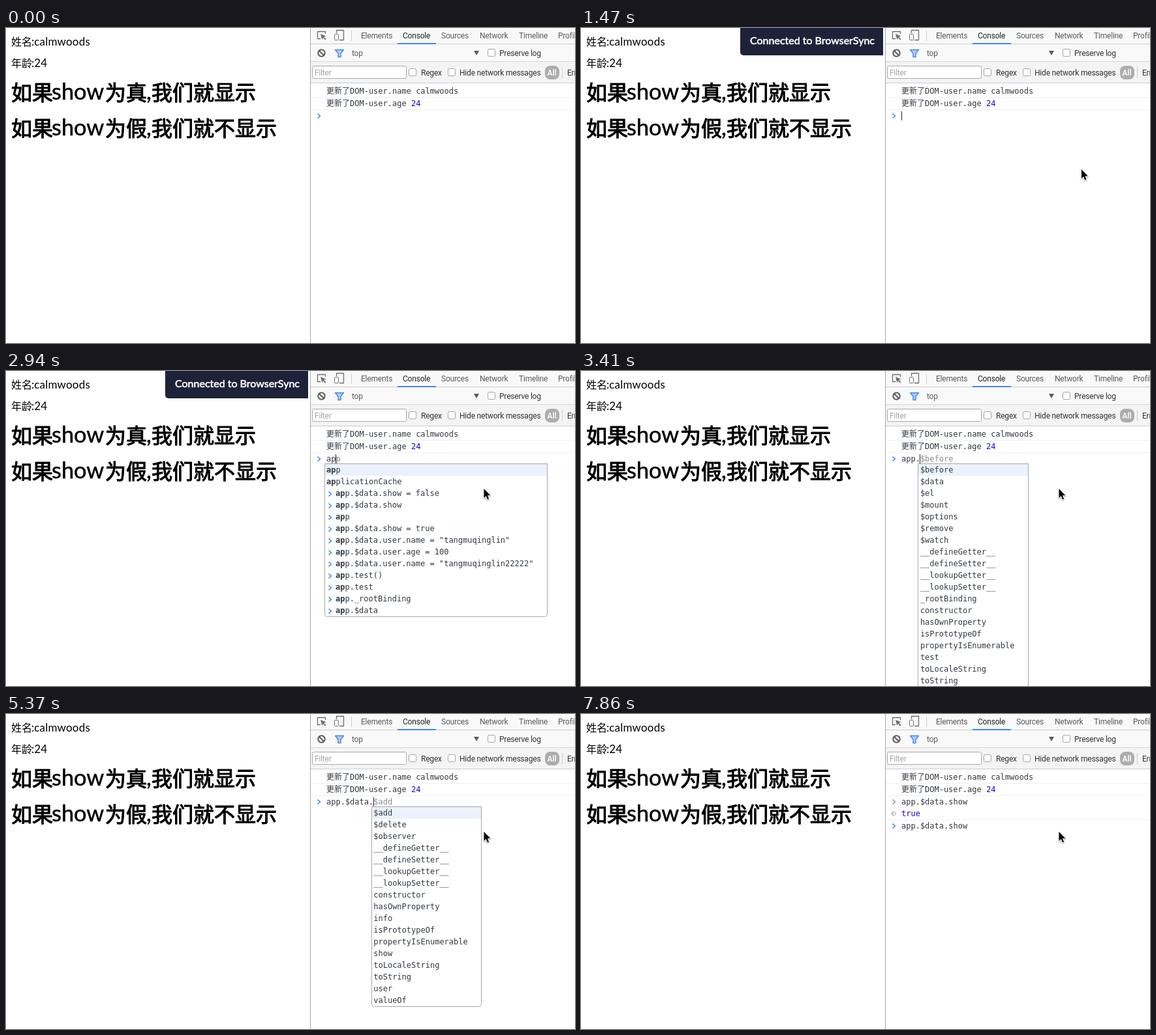
Recreate the animation shown at these times as an HTML page with a canvas. Size 872 by 484 pixels, loop 8000 ms.

```html
<!DOCTYPE html>
<html lang="zh">
<head>
<meta charset="utf-8">
<title>Console demo</title>
<style>
html, body { margin: 0; width: 100%; height: 100%; overflow: hidden; background: #fff; }
canvas { display: block; width: 872px; height: 484px; }
</style>
</head>
<body>
<canvas id="stage"></canvas>
<script>
const W = 872, H = 484, LOOP = 8000;
const cv = document.getElementById('stage');
const g = cv.getContext('2d');
const dpr = window.devicePixelRatio || 1;
cv.width = W * dpr;
cv.height = H * dpr;

const CJK = '"Noto Sans CJK SC", "Noto Sans CJK", "Noto Sans CJK JP", sans-serif';
const UI = '12px Roboto, sans-serif';
const MONO = '12px "DejaVu Sans Mono", ' + CJK.replace('sans-serif', 'monospace');
const ROUND = size => size + 'px Lato, sans-serif';
const INK = '#303942', NUM = '#1c00cf', BLUE = '#4285f4';
const COL = 7.2246, LEFT = 491;
const USER = 'calmwoods', OWNER = 'tangmuqinglin';

// ---------- console data ----------
const history = [
  'app.$data.show = false', 'app.$data.show', 'app', 'app.$data.show = true',
  `app.$data.user.name = "${OWNER}"`, 'app.$data.user.age = 100',
  `app.$data.user.name = "${OWNER}22222"`,
  'app.test()', 'app.test', 'app._rootBinding', 'app.$data'
];
const words = s => s.split(' ');
const magic = '__defineGetter__ __defineSetter__ __lookupGetter__ __lookupSetter__';
const members = {
  0: words('addEventListener alert app applicationCache arguments atob'),
  4: words('$before $data $el $mount $options $remove $watch ' + magic +
    ' _rootBinding constructor hasOwnProperty isPrototypeOf propertyIsEnumerable' +
    ' test toLocaleString toString valueOf'),
  10: words('$add $delete $observer ' + magic + ' constructor hasOwnProperty info' +
    ' isPrototypeOf propertyIsEnumerable show toLocaleString toString user valueOf')
};

// key time, typed length, time the suggestions follow
const CMD = 'app.$data.show';
const keys = [
  [2520, 1, 2640], [2940, 2, 2940], [3150, 3, 3150], [3410, 4, 3410],
  [4130, 5, 4160], [4480, 6, 4510], [4660, 7, 4690], [4900, 8, 4900],
  [5080, 9, 5100], [5340, 10, 5370], [5660, 11, 5660], [5750, 12, 5750],
  [5930, 13, 5930], [6050, 14, 6050]
];
const CLEAR = 890, BLANK = 970, READY = 1150, TOAST = [1220, 3270];
const ENTER = 6970, RESULT = 7000, RECALL = 7470;
const caretOn = [[230, 680], [CLEAR, 1720], [2070, 6520], [ENTER, 7860]];

const within = (t, [a, b]) => t >= a && t < b;
const typed = (t, slot) => {
  const hit = keys.filter(k => k[slot] <= t).pop();
  return hit ? CMD.slice(0, hit[1]) : '';
};

// ---------- drawing helpers ----------
function text(s, x, y, font, color, spacing = 0) {
  g.font = font;
  g.fillStyle = color;
  g.letterSpacing = spacing + 'px';
  g.fillText(s, x, y);
  return x + g.measureText(s).width;
}
// regular face thickened by an outline, lighter than a true bold
function heavy(s, x, y, font, color, weight) {
  text(s, x, y, font, color);
  g.strokeStyle = color;
  g.lineWidth = weight;
  g.lineJoin = 'round';
  g.strokeText(s, x, y);
}
const label = (s, x, y, color = '#333') => text(s, x, y, UI, color, -0.2);
const mono = (s, x, y, color = INK) => text(s, x, y, MONO, color);

function rect(x, y, w, h, color) {
  g.fillStyle = color;
  g.fillRect(x, y, w, h);
}
function box(x, y, w, h, r, fill, stroke) {
  g.beginPath();
  g.roundRect(x, y, w, h, r);
  if (fill) { g.fillStyle = fill; g.fill(); }
  if (stroke) { g.strokeStyle = stroke; g.lineWidth = 1; g.stroke(); }
}
function path(pts, color, width, close, fill) {
  g.beginPath();
  pts.forEach(([x, y]) => g.lineTo(x, y));
  if (close) g.closePath();
  if (fill) { g.fillStyle = fill; g.fill(); }
  if (width) { g.strokeStyle = color; g.lineWidth = width; g.stroke(); }
}
const chevron = (x, y, color, dir = 1) =>
  path([[x, y - 3.5], [x + 4 * dir, y], [x, y + 3.5]], color, 1.6);
const checkbox = (x, y) => box(x + .5, y + .5, 11, 11, 2, '#fff', '#a3a3a3');

// ---------- page on the left ----------
function heading(y, cond, tail) {
  const han = (s, x) => heavy(s, x, y + 1, '32px ' + CJK, '#000', 1.1);
  const latin = (s, x) => heavy(s, x, y, ROUND(34.4), '#000', 0.5);
  han('如果', 8);
  latin('show', 70);
  han(cond, 152);
  latin(',', 215);
  han(tail, 223);
}
function field(name, value, y) {
  text(name, 8, y, '16px ' + CJK, '#000');
  const x = text(':', 39, y, ROUND(17), '#000');
  text(value, Math.max(x, 43), y, ROUND(17), '#000', 0.2);
}
function page(t) {
  const raw = within(t, [BLANK, READY]);
  field('姓名', raw ? '{{user.name}}' : USER, 27);
  field('年龄', raw ? '{{user.age}}' : '24', 59.5);
  heading(110, '为真', '我们就显示');
  heading(164.5, '为假', '我们就不显示');
  if (within(t, TOAST)) {
    box(244, 0, 219, 42, [0, 0, 0, 5], '#1d2238');
    heavy('Connected to BrowserSync', 259, 24.5, ROUND(16), '#fff', 0.6);
  }
}

// ---------- devtools chrome ----------
function toolbar() {
  rect(467, 0, 405, 52, '#f9f9f9');
  rect(467, 52, 405, 32, '#f4f4f4');
  rect(467, 24, 405, 1, '#ccc');
  rect(467, 51, 405, 1, '#d6d6d6');
  rect(467, 84, 405, 1, '#ccc');
  rect(466, 0, 1, H, '#a8a8a8');

  // inspect and device icons
  const grey = '#6e6e6e';
  path([[482, 16.5], [477.5, 16.5], [477.5, 5.5], [489.5, 5.5], [489.5, 9]], grey, 1.3);
  path([[482, 9], [490.5, 12.5], [487, 13.8], [490.5, 17.3], [489.2, 18.5],
    [485.8, 15], [484.3, 18]], grey, 0, true, grey);
  path([[506.5, 8], [506.5, 3.5], [517.5, 3.5], [517.5, 18.5], [511, 18.5]], grey, 1.3);
  box(503.5, 9.5, 6, 9, 1, '#f9f9f9', grey);
  rect(529, 4, 1, 16, '#ccc');

  [['Elements', 544], ['Console', 608], ['Sources', 667], ['Network', 726],
    ['Timeline', 786], ['Profiles', 846]].forEach(([s, x]) =>
    label(s, x, 16, s === 'Console' ? '#222' : '#5a5a5a'));
  rect(600, 23, 59, 2, BLUE);

  // clear and filter icons
  g.beginPath();
  g.arc(483.5, 38.5, 5.2, 0, 7);
  g.strokeStyle = '#5a5a5a';
  g.lineWidth = 2;
  g.stroke();
  path([[480, 35], [487, 42]], '#5a5a5a', 2);
  path([[504.5, 33.5], [517.5, 33.5], [513, 39], [513, 44.5], [509, 44.5], [509, 39]],
    BLUE, 1.4, true, '#b4cdfa');

  label('top', 530, 43, '#5a5a5a');
  path([[717, 35], [725, 35], [721, 42]], '', 0, true, '#5a5a5a');
  checkbox(738, 32);
  label('Preserve log', 756, 43);

  box(469.5, 58.5, 144, 19, 2, '#fff', '#a9a9a9');
  label('Filter', 473, 73, '#a5a5a5');
  checkbox(617, 62);
  label('Regex', 636, 73);
  checkbox(677, 62);
  label('Hide network messages', 695, 73);
  box(826, 58, 22, 21, 8, '#adadad');
  text('All', 829.5, 73, '500 ' + UI, '#fff');
  rect(852, 60, 1, 17, '#ccc');
  label('Errors', 860, 73);
}

// ---------- console ----------
function matches(input) {
  const col = input.lastIndexOf('.') + 1, word = input.slice(col);
  const names = members[col].filter(s => s.startsWith(word));
  const past = word ? history.filter(s => s.startsWith(input)).map(s => s.slice(col)) : [];
  return { col, word, names, past };
}

function popup({ col, word, names, past }) {
  const x = LEFT + col * COL, left = Math.floor(x - 3);
  const rows = [...names.map(s => [s, 0]), ...past.map(s => [s, 14])];
  const right = Math.round(x + 21.6 + Math.max(...rows.map(([s, dx]) => dx + s.length * COL)));
  box(left + .5, 142.5, right - left - 1, rows.length * 18 + 1, [0, 0, 4, 4], '#fff', '#a8a8a8');
  rect(left + 1, 143, right - left - 2, 18, '#ebf2fc');
  rows.forEach(([s, dx], i) => {
    const y = 156 + i * 18;
    if (dx) chevron(x + dx - 10.5, y - 3, BLUE);
    text(word, x + dx, y, 'bold ' + MONO, INK);
    mono(s.slice(word.length), x + dx + word.length * COL, y);
  });
}

function prompt(t, y, input, ghost) {
  chevron(477.5, y, BLUE);
  mono(input, LEFT, y + 4);
  const x = LEFT + input.length * COL;
  mono(ghost, x, y + 4, '#8c8c8c');
  if (caretOn.some(span => within(t, span))) rect(Math.floor(x), y - 7, 1, 14, '#222');
}

function consoleView(t) {
  if (within(t, [CLEAR, READY])) return prompt(t, 97, '', '');
  const rule = y => rect(467, y, 405, 1, '#f0f0f0');
  mono('更新了DOM-user.name ' + USER, LEFT, 101);
  mono('24', mono('更新了DOM-user.age ', LEFT, 120), 120, NUM);
  rule(106);
  rule(125);

  if (t >= RESULT) {
    chevron(477.5, 135, '#8c8c8c');
    mono(CMD, LEFT, 139);
    chevron(480, 153, '#a0a0a0', -1);
    rect(481, 152, 2, 2, '#a0a0a0');
    mono('true', LEFT, 157, NUM);
    rule(162);
    return prompt(t, 172, t >= RECALL ? CMD : '', '');
  }
  const input = typed(t, 0), shown = typed(t, 2);
  const list = shown && t < ENTER ? matches(shown) : null;
  const ghost = list && shown === input ? list.names[0].slice(list.word.length) : '';
  prompt(t, 135, input, ghost);
  if (list) popup(list);
}

// ---------- pointer ----------
function pointer(t) {
  const start = 1240, turn = 1690, end = 1830;
  if (t < start) return;
  const a = Math.min(1, (t - start) / (turn - start));
  const b = Math.max(0, Math.min(1, (t - turn) / (end - turn)));
  const x = 732.5 + 137 * (1 - a) ** 2 + 2 * (1 - b);
  const y = 181 + 26 * (1 - b) ** 1.5 + 21 * (1 - a);
  g.save();
  g.translate(x, y);
  g.shadowColor = 'rgba(0,0,0,.35)';
  g.shadowBlur = 2 * dpr;
  g.shadowOffsetY = dpr;
  g.lineJoin = 'round';
  const arrow = [[0, 0], [0, 14], [3.2, 11], [5.4, 16.3], [7.6, 15.4], [5.4, 10.2], [9.8, 10]];
  path(arrow, '#fff', 2, true, '#fff');
  g.shadowColor = 'transparent';
  path(arrow, '', 0, true, '#000');
  g.restore();
}

function frame() {
  const t = performance.now() % LOOP;
  g.setTransform(dpr, 0, 0, dpr, 0, 0);
  rect(0, 0, W, H, '#fff');
  page(t);
  toolbar();
  consoleView(t);
  pointer(t);
  requestAnimationFrame(frame);
}
frame();
</script>
</body>
</html>
```
